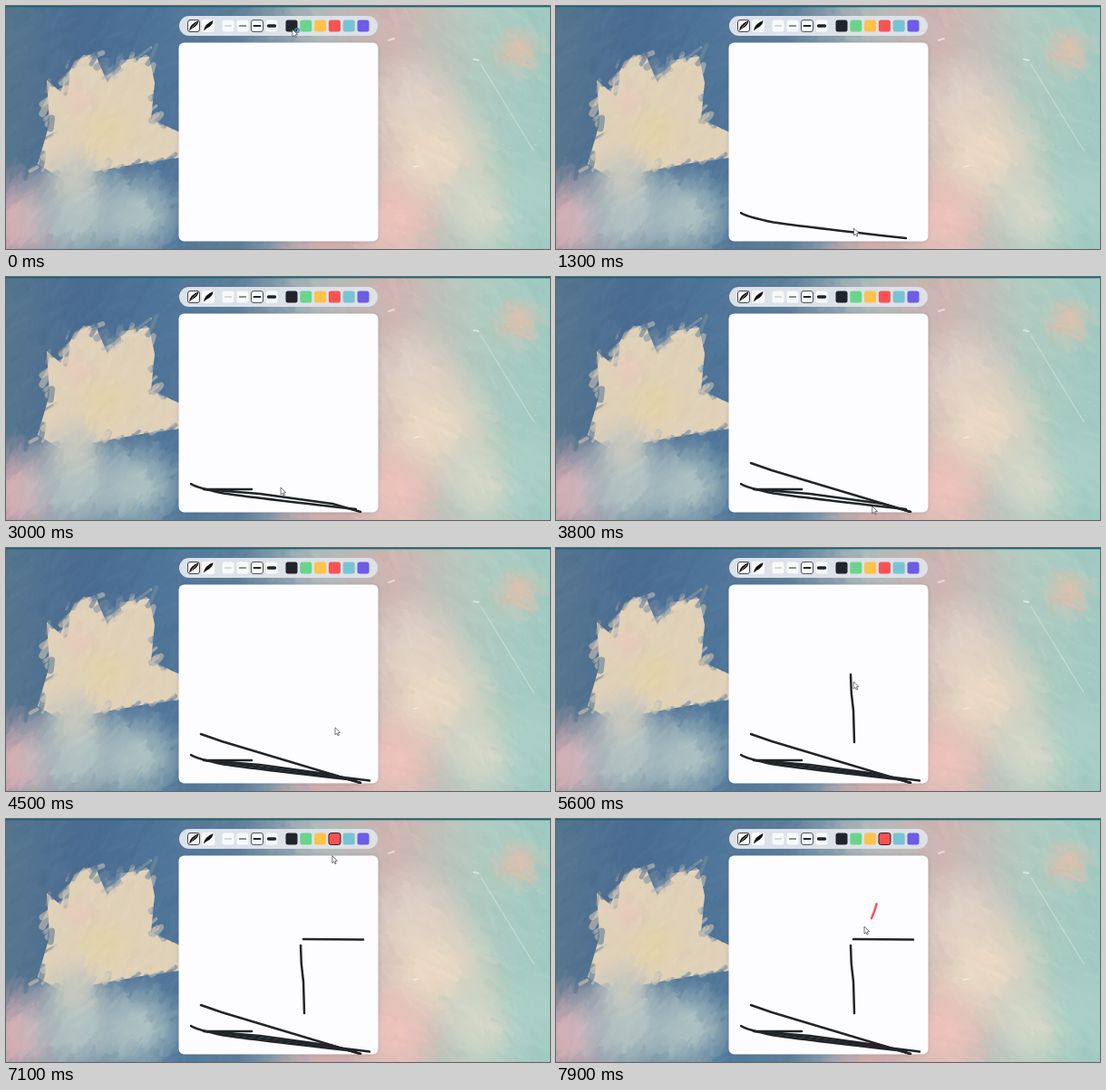
Animation of 600x269 px, one loop 8 s. Source, as an HTML page with a canvas:

```html
<!DOCTYPE html>
<html lang="en">
<head>
<meta charset="utf-8">
<title>Drawing board</title>
<style>
html, body { margin: 0; width: 100%; height: 100%; overflow: hidden; background: #b9c4c0 }
canvas { display: block; width: 600px; height: 269px }
</style>
</head>
<body>
<canvas id="stage" width="600" height="269"></canvas>
<script>
const W = 600, H = 269, LOOP = 8000, PICK_RED = 6800;
const INK = '#212529', RED = '#fa5252';
const stage = document.getElementById('stage').getContext('2d');

let seed = 7;
const rand = () => (seed = seed * 16807 % 2147483647) / 2147483647;
const spread = d => (rand() * 2 - 1) * d;

function line(c, x1, y1, x2, y2, color, width) {
  c.beginPath();
  c.moveTo(x1, y1);
  c.lineTo(x2, y2);
  c.strokeStyle = color;
  c.lineWidth = width;
  c.stroke();
}

function box(c, x, y, w, h, r, fill, border) {
  c.beginPath();
  c.roundRect(x, y, w, h, r);
  c.fillStyle = fill;
  c.fill();
  if (border) {
    c.strokeStyle = border;
    c.lineWidth = 1;
    c.stroke();
  }
}

function wash(c, color, x, y, r) {
  const g = c.createRadialGradient(x, y, r * 0.3, x, y, r * 1.3);
  g.addColorStop(0, color);
  g.addColorStop(1, color + '00');
  c.fillStyle = g;
  c.fillRect(0, 0, W, H);
}

function paintSky(c) {
  const sky = c.createLinearGradient(0, 0, W, 0);
  const tones = ['#56768f', '#4a6c92', '#4f7599', '#5d7e9b', '#b0babb', '#d0b5b1', '#b3cac1', '#9fcbc2'];
  tones.forEach((tone, i) => sky.addColorStop(i / (tones.length - 1), tone));
  c.fillStyle = sky;
  c.fillRect(0, 0, W, H);

  wash(c, '#d3aeb5', 15, 240, 52);
  wash(c, '#b2c2c2', 80, 230, 58);
  wash(c, '#abc0c1', 145, 232, 45);
  c.fillStyle = '#e0d1b9';
  c.fill(new Path2D('M45 82L60 95 75 62 98 52 112 85 128 60 158 56 164 85 160 125 192 140V168L160 172 60 190 35 175 48 130Z'));
  wash(c, '#c6c8bf', 75, 190, 30);
  wash(c, '#e3d3ac', 110, 140, 28);
  wash(c, '#e6cbb9', 80, 105, 18);
  wash(c, '#a9b0b4', 115, 72, 8);

  wash(c, '#dccfc7', 450, 105, 48);
  wash(c, '#e9d8c4', 470, 165, 62);
  wash(c, '#ebc2ba', 425, 235, 48);
  wash(c, '#d3d6c7', 525, 225, 45);
  wash(c, '#a9cfc6', 590, 215, 45);
  wash(c, '#d9c2b0', 565, 50, 24);
  wash(c, '#d8a9a8', 350, 290, 50);
}

// Smears the sky with short strokes that pick up colour from nearby.
function brush(c) {
  const { data } = c.getImageData(0, 0, W, H);
  const clamp = (v, max) => Math.max(0, Math.min(max - 1, Math.round(v)));
  c.lineCap = 'round';
  c.globalAlpha = 0.5;
  for (let i = 0; i < 2000; i++) {
    const x = rand() * W, y = rand() * H, len = 3 + rand() * 9;
    const angle = (x < 300 ? -0.95 : 0.75) + spread(0.6);
    const dx = Math.cos(angle) * len, dy = Math.sin(angle) * len;
    const at = 4 * (clamp(y + spread(7), H) * W + clamp(x + spread(7), W));
    const shade = spread(5);
    const color = `rgb(${[0, 1, 2].map(k => Math.round(data[at + k] + shade))})`;
    line(c, x - dx, y - dy, x + dx, y + dy, color, 2 + rand() * 6);
  }
  line(c, 524, 65, 582, 160, '#e6eee5', 1.2);
  line(c, 422, 38, 428, 36, '#fff', 2);
  line(c, 516, 59, 521, 60, '#fff', 2);
  line(c, 450, 178, 455, 177, '#fff', 1.5);
  c.fillStyle = '#f6f5ee';
  for (let i = 0; i < 14; i++) c.fillRect(500 + rand() * 95, 10 + rand() * 150, 1, 1);
  c.globalAlpha = 1;
  c.fillStyle = '#0c6b78';
  c.fillRect(0, 0, W, 1.3);
}

function nib(c, x) {
  c.fillStyle = '#111';
  c.fill(new Path2D(`M${x - 5} 27.5Q${x - 4.5} 20 ${x + 5.5} 16Q${x + 5} 22 ${x - 2} 25Z`));
}

function paintPanels(c) {
  c.shadowColor = 'rgba(40,50,70,.2)';
  c.shadowBlur = 4;
  box(c, 190.5, 40.5, 220, 220, 6, '#fdfcfe');
  c.shadowBlur = 0;
  box(c, 191, 11, 219, 22, 11, '#dde1e8');

  box(c, 200.5, 15.5, 13, 13, 2.5, '#fff', '#444');
  box(c, 216, 15, 14, 14, 2.5, '#f8f9fa');
  nib(c, 207);
  line(c, 205, 24, 210.5, 18.5, '#fff', 0.5);
  nib(c, 223);

  for (let i = 0; i < 4; i++) {
    const x = 238 + i * 16;
    box(c, x + 0.5, 15.5, 13, 13, 2.5, '#f8f9fa', i === 2 && '#555');
    line(c, x + 3.5, 22, x + 10.5, 22, i ? INK : '#999', 0.7 * 1.7 ** i);
  }
  [INK, '#69d58b', '#ffc24a', RED, '#78c3d2', '#6c5ce7'].forEach((color, i) =>
    box(c, 308.5 + i * 15.8, 15.5, 13, 13, 2.5, color));
}

const scene = document.createElement('canvas');
scene.width = W;
scene.height = H;
const sceneCtx = scene.getContext('2d');
paintSky(sceneCtx);
brush(sceneCtx);
paintPanels(sceneCtx);

// Pointer moves from start to end ms along a path; bare points are stops without ink.
function move(start, end, d) {
  const path = document.createElementNS('http://www.w3.org/2000/svg', 'path');
  path.setAttribute('d', d);
  const length = path.getTotalLength();
  return {
    start, end, length,
    shape: new Path2D(d),
    color: start > PICK_RED ? RED : INK,
    at: k => path.getPointAtLength(length * k)
  };
}
const moves = [
  move(0, 0, 'M316 26L316 26'),
  move(400, 1000, 'M204 229Q209 233 240 239.5Q270 244 386 257'),
  move(1600, 2700, 'M271 235H218L280 240 360 251 391 260'),
  move(3300, 3750, 'M215 206L238 214 391 260'),
  move(3900, 4200, 'M228 236L401 257.5'),
  move(4800, 5200, 'M325 140Q325 160 328 180L329 215'),
  move(5750, 6150, 'M328 133L394 133.5'),
  move(6700, 6900, 'M362 22L362 22'),
  move(7500, 7750, 'M353.5 94Q352 101 348 110'),
  move(7900, LOOP, 'M340 119L340 119')
];

const ease = k => k * k * (3 - 2 * k);

function pointerAt(t) {
  const next = moves.findIndex(m => m.start > t);
  const last = moves.at(next < 0 ? -1 : next - 1);
  if (t <= last.end) return last.at((t - last.start) / (last.end - last.start || 1));
  const k = ease((t - last.end) / (moves[next].start - last.end));
  const a = last.at(1), b = moves[next].at(0);
  return { x: a.x + (b.x - a.x) * k, y: a.y + (b.y - a.y) * k };
}

function drawInk(c, t) {
  c.save();
  c.beginPath();
  c.roundRect(190, 40, 221, 221, 6);
  c.clip();
  c.lineCap = c.lineJoin = 'round';
  c.lineWidth = 2.5;
  for (const m of moves) {
    if (!m.length || t <= m.start) continue;
    const k = Math.min(1, (t - m.start) / (m.end - m.start));
    c.setLineDash(k < 1 ? [m.length * k, m.length] : []);
    c.strokeStyle = m.color;
    c.stroke(m.shape);
  }
  c.restore();
}

const arrow = new Path2D('M0 0V8L1.9 6.3 3.1 9 4.4 8.4 3.2 5.8 5.7 5.6Z');

function drawPointer(c, { x, y }) {
  c.save();
  c.translate(x, y);
  c.fillStyle = '#fff';
  c.fill(arrow);
  c.strokeStyle = '#50545a';
  c.lineWidth = 0.8;
  c.stroke(arrow);
  c.restore();
}

function frame(now) {
  const t = Math.floor(now % LOOP / 100) * 100;
  stage.drawImage(scene, 0, 0);
  if (t >= PICK_RED) box(stage, 356, 15.5, 13, 13, 2.5, RED, INK);
  drawInk(stage, t);
  drawPointer(stage, pointerAt(t));
  if (t < 100) {
    stage.beginPath();
    stage.arc(321, 27, 2.2, 0, Math.PI * 2);
    stage.strokeStyle = '#3f7fae';
    stage.lineWidth = 1.4;
    stage.stroke();
  }
  requestAnimationFrame(frame);
}
requestAnimationFrame(frame);
</script>
</body>
</html>
```
